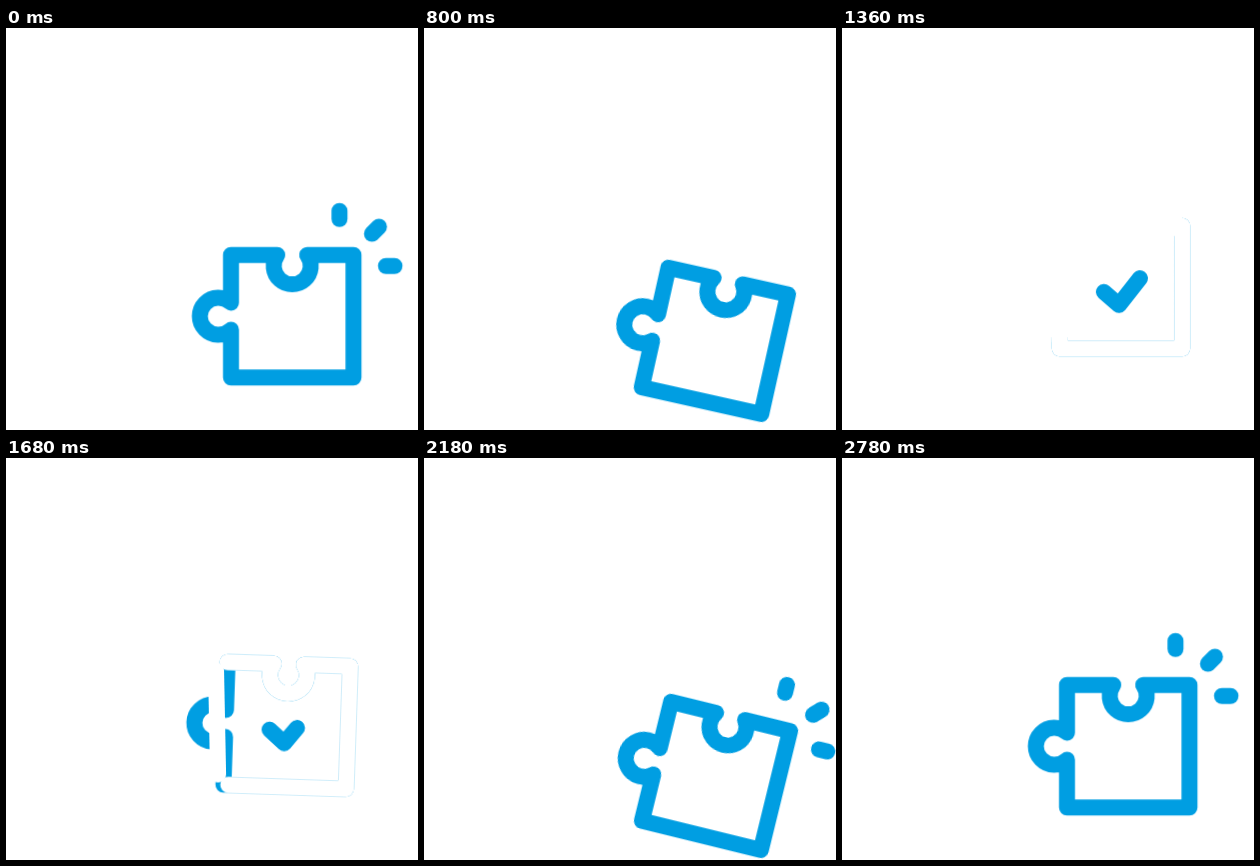
These frames come from a looping animation (412x402 px, 3 s). An HTML page:

```html
<!DOCTYPE html>
<html lang="en">
<head>
<meta charset="utf-8">
<title>Puzzle piece</title>
<style>
  html, body { margin: 0; width: 100%; height: 100%; overflow: hidden; background: #fff; }
  svg { display: block; width: 100vw; height: 100vh; }
  path { fill: none; stroke: #009ee2; stroke-width: 16; stroke-linecap: round; stroke-linejoin: round; }
  .white { stroke: #fff; }
  .trim { stroke-dasharray: 1 3; }
  #joint { stroke-width: 20; stroke-linecap: butt; }
</style>
</head>
<body>
<svg viewBox="0 0 412 402">
  <g id="piece">
    <path id="outline"/>
    <path id="fade" class="white trim" pathLength="1"/>
    <path id="joint" class="white" d="M-61.25 50V13.5A18.5 18.5 0 1 1 -61.25 -13.5V-61.25H-15A18.5 18.5 0 1 0 15 -61.25H61.25"/>
    <path id="check" class="trim" pathLength="1" d="M-17 4.8L-2 17.8L19 -9"/>
    <path class="ray trim" pathLength="1" d="M47.25 -97.25V-105.25"/>
    <path class="ray trim" pathLength="1" d="M79.75 -82.5L86.75 -89.5"/>
    <path class="ray trim" pathLength="1" d="M93.75 -50.25H102.25"/>
  </g>
  <!-- edge of the unseen neighbour on the left -->
  <path id="edge" class="white" d="M0 -52V52"/>
</svg>
<script>
const LOOP = 3000;
const $ = id => document.getElementById(id);
const SMOOTH = 'cubic-bezier(.42,0,.58,1)';
const JOIN = 'cubic-bezier(.4,0,.75,1)';
const LEAVE = 'cubic-bezier(.33,0,.5,1)';

const shape = 'M-61.25 -61.25H-15A18.5 18.5 0 1 0 15 -61.25H61.25V61.25H-61.25' +
  'V13.5A18.5 18.5 0 1 1 -61.25 -13.5Z';
$('outline').setAttribute('d', shape);
$('fade').setAttribute('d', shape);

const pose = (x, y, deg) => `translate(${x}px, ${y}px) rotate(${deg}deg)`;

// steps: [time in ms, value, easing towards the next step]
function run(el, prop, steps) {
  const frames = steps.map(([ms, value, easing = 'linear']) =>
    ({ offset: ms / LOOP, [prop]: value, easing }));
  const anim = el.animate(frames, { duration: LOOP, iterations: Infinity });
  anim.startTime = document.timeline.currentTime;
}

const rest = pose(286.25, 288.25, 0);
const tilted = pose(292, 318, 13.8);
const fitted = pose(278.9, 259.2, 0);
run($('piece'), 'transform', [
  [0, rest, SMOOTH], [460, tilted], [650, tilted, JOIN],
  [1360, fitted], [1540, fitted, LEAVE],
  [2200, tilted], [2470, tilted, SMOOTH], [2780, rest], [LOOP, rest]
]);

const away = pose(172, 298, -8);
const near = pose(217.5, 259, 0);
run($('edge'), 'transform', [
  [0, away], [650, away, JOIN], [1360, near], [1540, near, LEAVE],
  [2200, away], [LOOP, away]
]);

// draws a line on, holds it, then takes it back
const drawOn = (el, from, until) => run(el, 'strokeDashoffset', [
  [0, 1.01], [from, 1.01, SMOOTH], [1360, 0], [1540, 0, SMOOTH],
  [until, 1.01], [LOOP, 1.01]
]);
drawOn($('fade'), 1000, 1907);
drawOn($('check'), 1080, 1940);

run($('joint'), 'opacity', [
  [0, 0], [1350, 0], [1350, 1], [1540, 1], [1540, 0], [LOOP, 0]
]);

for (const ray of document.querySelectorAll('.ray')) {
  run(ray, 'strokeDashoffset', [
    [0, 0], [280, 0, SMOOTH], [510, -1.01], [510, 1.01],
    [1780, 1.01, SMOOTH], [2110, 0], [LOOP, 0]
  ]);
}
</script>
</body>
</html>
```
